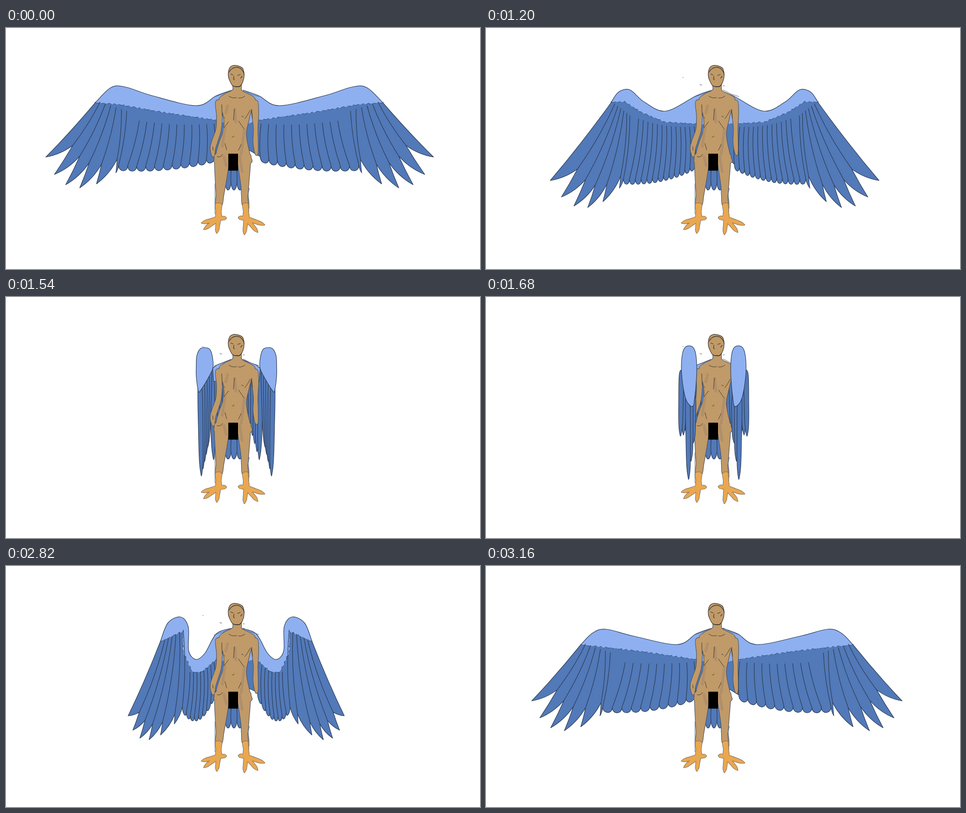
An HTML page that plays this animation: 1048x534 px, repeating every 3.36 s.

```html
<!DOCTYPE html>
<html lang="en">
<head>
<meta charset="utf-8">
<title>Wing fold</title>
<style>
html, body { margin: 0; width: 100%; height: 100%; overflow: hidden; background: #fff; }
svg { display: block; width: 100vw; height: 100vh; }
path { stroke-linecap: round; stroke-linejoin: round; }
</style>
</head>
<body>
<svg viewBox="0 0 1048 534">
  <g id="back"></g>
  <g id="body"></g>
  <g id="front"></g>
</svg>
<script>
const BLUE = '#5279b8', LIGHT = '#8eb0f0', INK = '#2b3a52', SKIN = '#c09a68',
      SHADE = '#b18f6a', CLAW = '#e9a751', DARK = '#3b3732';

const $ = id => document.getElementById(id);
const pts = text => text.trim().split(/\s+/).map(p => p.split(',').map(Number));
const mix = (a, b, t) => a.map((v, k) => v + (b[k] - v) * t);
const along = (line, t) => line.length < 3 ? mix(line[0], line[1], t)
  : mix(mix(line[0], line[1], t), mix(line[1], line[2], t), t);

// Smooth curve through points.
function smooth(p, closed = false) {
  const n = p.length;
  const at = i => closed ? p[(i + n) % n] : p[Math.max(0, Math.min(n - 1, i))];
  let d = 'M' + p[0];
  for (let i = 0; i < (closed ? n : n - 1); i++) {
    const [a, b, c, e] = [at(i - 1), at(i), at(i + 1), at(i + 2)];
    d += `C${b.map((v, k) => v + (c[k] - a[k]) / 6)} ${c.map((v, k) => v - (e[k] - b[k]) / 6)} ${c}`;
  }
  return d + (closed ? 'Z' : '');
}

// Rounded shape around a centre line of x, y, half width.
function limb(p) {
  const side = s => p.map(([x, y, r], i) => {
    const a = p[Math.max(0, i - 1)], b = p[Math.min(p.length - 1, i + 1)];
    const dx = b[0] - a[0], dy = b[1] - a[1], len = Math.hypot(dx, dy);
    return [x - s * r * dy / len, y + s * r * dx / len];
  });
  return smooth([...side(1), ...side(-1).reverse()], true);
}

function bow(a, b, bend) {
  const m = mix(a, b, .5);
  return `Q${m[0] - (b[1] - a[1]) * bend},${m[1] + (b[0] - a[0]) * bend} ${b}`;
}

// Row of small scallops along a line.
function scallops(p) {
  let d = 'L' + p[0];
  for (let i = 1; i < p.length; i++) {
    const len = Math.hypot(p[i][0] - p[i - 1][0], p[i][1] - p[i - 1][1]);
    const n = Math.round(len / 11), r = len / n * .75;
    for (let k = 1; k <= n; k++) d += `A${r} ${r} 0 0 0 ${mix(p[i - 1], p[i], k / n)}`;
  }
  return d;
}

function add(parent, d, fill = 'none', stroke = 'none', width = 1.2, dash = '') {
  const el = document.createElementNS('http://www.w3.org/2000/svg', 'path');
  const set = { d, fill, stroke, 'stroke-width': width, 'stroke-dasharray': dash };
  for (const key in set) el.setAttribute(key, set[key]);
  parent.append(el);
}

function group(parent, transform = '') {
  const g = document.createElementNS('http://www.w3.org/2000/svg', 'g');
  g.setAttribute('transform', transform);
  parent.append(g);
  return g;
}

// Open wings: tips, hem and roots are straight lines or quadratic arcs.
const poses = {
  spread: {
    axis: 1035.5, stretch: 1.025, split: .4, plumes: 11,
    top: '498,138 465,150 420,172 320,149 265,131 232,132 196,167',
    tips: '88,286 128,402 243,321', roots: '208,164 267,184',
    hem: '249,304 360,311 462,285', hemRoots: '278,203 370,220 460,212',
    coverts: '196,164 250,168 350,186 465,203'
  },
  lowered: {
    axis: 1021, split: .38, plumes: 10,
    top: '498,138 465,150 422,174 325,155 265,140 235,149 209,175',
    tips: '101,299 138,412 252,332', roots: '220,173 275,192',
    hem: '258,312 365,320 462,286', hemRoots: '290,212 380,222 460,212',
    coverts: '209,173 265,179 345,188 465,206'
  },
  bent: {
    axis: 1011, split: .3, plumes: 13, dots: true,
    top: '498,138 465,150 398,184 350,164 318,137 293,142 276,166',
    tips: '142,338 200,450 295,355', roots: '285,168 318,194',
    hem: '304,334 390,339 462,302', hemRoots: '327,197 395,225 460,218',
    coverts: '276,163 307,162 345,186 395,207 465,211'
  },
  tucked: {
    axis: 1018, split: .2, plumes: 8, dots: true,
    top: '498,138 465,150 440,193 420,207 404,188 403,135 386,113 358,126 341,168',
    tips: '270,332 290,429 372,350', roots: '351,165 392,142',
    hem: '390,312 425,365 462,280', hemRoots: '399,232 430,246 460,213',
    coverts: '341,166 392,143 393,190 413,234 432,234 465,205'
  },
  closing: {
    axis: 1019, dots: true,
    shoulder: '498,138 465,151 457,158 459,187 480,186 500,160',
    fans: [
      { roots: '484,180 455,165', tips: '484,270 459,357', count: 6 },
      { roots: '450,165 429,200', tips: '446,330 432,393', count: 5 }
    ],
    lobe: '440,114,9 439,130,17 439,155,18.5 433,180,12.5 427,208,2'
  },
  closed: {
    axis: 1007, dots: true, inFront: true,
    shoulder: '498,138 463,152 463,170 500,165',
    fans: [
      { roots: '485,165 432,170', tips: '482,285 430,306', count: 9 },
      { roots: '459,225 446,225', tips: '458,322 448,401', count: 3, inFront: true }
    ],
    lobe: '449,110,7 449,125,14.5 449,160,17 450,200,14 452,228,9 456,241,3'
  }
};

function drawOpen(g, pose) {
  const [top, tips, roots, hem, hemRoots, coverts] =
    ['top', 'tips', 'roots', 'hem', 'hemRoots', 'coverts'].map(key => pts(pose[key]));
  const count = 6, drop = 16;
  let outline = smooth(top), dividers = '', from = top.at(-1);
  for (let i = 0; i < count; i++) {
    const tip = along(tips, i / (count - 1)), root = along(roots, i / (count - 1));
    const notch = i === count - 1 ? hem[0]
      : mix(along(tips, (i + 1) / (count - 1)), root, pose.split * (1 - .7 * i / count));
    outline += bow(from, tip, -.02) + bow(tip, notch, .12);
    dividers += 'M' + notch + bow(notch, root, .05);
    from = notch;
  }
  for (let i = 1; i <= pose.plumes; i++) {
    const a = along(hem, (i - 1) / pose.plumes), b = along(hem, i / pose.plumes);
    outline += `C${a[0]},${a[1] + drop} ${b[0]},${b[1] + drop} ${b}`;
    dividers += 'M' + b + bow(b, along(hemRoots, i / pose.plumes), .05);
  }
  outline += 'L500,262Z';
  const edge = scallops(coverts);
  add(g, outline, BLUE);
  add(g, smooth(top) + edge + 'L500,217Z', LIGHT);
  add(g, outline + dividers, 'none', INK);
  add(g, edge.replace('L', 'M'), 'none', INK, .9, '10 6 5 9');
}

function drawFan(g, { roots, tips, count }) {
  for (let i = 0; i < count; i++) {
    const root = along(pts(roots), i / (count - 1)), tip = along(pts(tips), i / (count - 1));
    const feather = [[0, 4.5], [.5, 5], [.85, 4], [1, 1]].map(([t, r]) => [...mix(root, tip, t), r]);
    add(g, limb(feather), BLUE, INK);
  }
}

function drawFolded(back, front, pose) {
  pose.fans.forEach(fan => drawFan(fan.inFront ? front : back, fan));
  add(back, 'M' + pose.shoulder + 'Z', LIGHT, INK);
  add(pose.inFront ? front : back, limb(pts(pose.lobe)), LIGHT, INK);
}

const layers = {};
for (const [name, pose] of Object.entries(poses)) {
  const back = group($('back')), front = group($('front'));
  for (const transform of ['', `matrix(${-(pose.stretch || 1)},0,0,1,${pose.axis},0)`]) {
    if (pose.lobe) drawFolded(group(back, transform), group(front, transform), pose);
    else drawOpen(group(back, transform), pose);
  }
  if (pose.dots) add(back, 'M435 109.5h1M473 125.5l4 1M526 127v2', 'none', '#555');
  layers[name] = [back, front];
}

function drawBody(g) {
  for (const x of [491, 517, 504])
    add(g, limb([[x, 312, 5], [x, 335, 7], [x, 350, 5.5], [x, 358, 2]]), BLUE, INK);

  const skin = [
    '472,163,8 472,195,6 470,225,5.5 462,250,6 457.5,266,5.5 458,283,2.5',
    '549,163,7 551,190,7 552,222,4.5 552,255,5 554,279,2.5',
    '478,280,14 477,300,15.5 474.5,345,11 473,370,8 470.5,392,6.5',
    '526,280,13 526.5,300,13.5 528,345,8.5 528,370,7 529.5,392,6.5',
    '511,126,8 511,138,10 510,147,27 511,157,39 510,178,33 509,205,27 506,230,25 503,255,31 502,280,37 502,300,36'
  ].map(text => limb(pts(text)));
  skin.forEach(d => add(g, d, 'none', '#4f555e', 2.4));
  skin.forEach(d => add(g, d, SKIN));
  add(g, 'M506 181L508 208M490 172L486 188M484 222L478 262M527 224L520 280M482 285L487 305M517 285L522 318', 'none', SHADE, 6);

  // Each foot: the ankle, then toes from it to their claws.
  const feet = [
    ['470,390 470,422', '433,432 438,446 466,454 487,421'],
    ['530,390 531,422', '514,420 527,457 556,452 571,436']
  ];
  for (const [shin, claws] of feet) {
    const [knee, ankle] = pts(shin);
    const parts = pts(claws).map(tip => limb([
      [...ankle, 4], [...mix(ankle, tip, .5), 4], [...mix(ankle, tip, .8), 3.5], [...tip, .6]
    ]));
    parts.push(limb([[...knee, 6.5], [...mix(knee, ankle, .5), 5.5], [...ankle, 6]]));
    parts.forEach(d => add(g, d, 'none', '#77695a', 2));
    parts.forEach(d => add(g, d, CLAW));
  }

  add(g, limb(pts('510,84,7 509,90,15 509,106,17.5 510,120,13.5 510,129,7')), SKIN, DARK);
  add(g, 'M493 98Q499 87 511 87Q522 88 527 103M497 102l5 2M512 105l6-2M504 107l-1 6 2 2M519 111l3-4M502 128l4 2h10l5-5', 'none', DARK, 1.3);
  add(g, 'M493 151q8 6 17 3M514 155q8 1 14-4M505 179L503 204M540 182Q534 194 528 201M521 195l4 2M481 197l3 3M492 208L482 221M514 206L526 223M500 241q4 2 4-2M484 256l4 14M520 258l-6 13M467 285q7 3 12-5M457 263l1 8M477 170L478 195M543 180L545 200', 'none', DARK, 1);
  add(g, 'M497 139L476 147L460 153M524 137L541 146L559 152M538 355L534 374L537 407M462 345L462 412', 'none', '#56657b', 1);
  add(g, 'M491.5 278.5H513V316H491.5Z', '#000');
}
drawBody($('body'));

const LOOP = 3360;
const steps = [
  [0, 'spread'], [1000, 'lowered'], [1200, 'bent'], [1400, 'tucked'], [1540, 'closing'],
  [1680, 'closed'], [2680, 'closing'], [2820, 'tucked'], [2960, 'bent'], [3160, 'lowered']
];
const start = performance.now();

function show(now) {
  const time = Math.max(0, now - start) % LOOP;
  const current = steps.filter(([at]) => at <= time).pop()[1];
  for (const name in layers)
    layers[name].forEach(g => g.style.display = name === current ? '' : 'none');
  requestAnimationFrame(show);
}
show(start);
</script>
</body>
</html>
```
